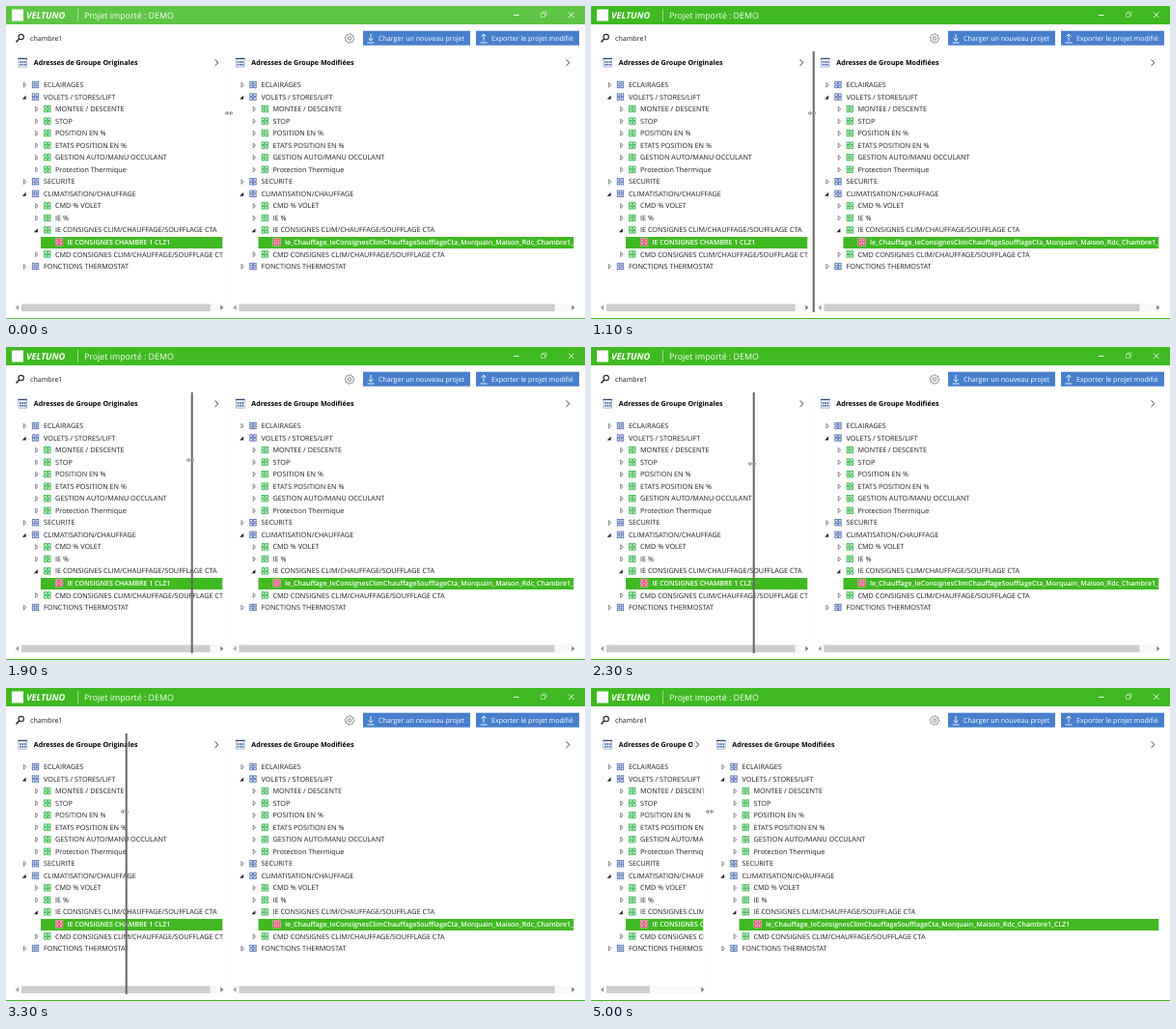
An HTML page that plays this animation: 600x324 px, repeating every 5100 ms.

```html
<!DOCTYPE html>
<html lang="fr">
<head>
<meta charset="utf-8">
<title>Projet importé</title>
<style>
  html, body { margin: 0; width: 100%; height: 100%; overflow: hidden; background: #fff; }
  svg { display: block; }
  text { font: 7.25px "Open Sans", "Noto Sans", sans-serif; fill: #1c1c1c; white-space: pre; text-rendering: geometricPrecision; }
  .line { fill: none; stroke: #333; }
</style>
</head>
<body>
<svg id="stage" width="600" height="324" viewBox="0 0 600 324"></svg>
<script>
const GREEN = '#40b922', BLUE = '#477fcc', LOOP = 5100;
const ACTIVATE = 400, PRESS = 500, DROP = 3600, SHIFT = 108;
const DRAG = [[1100, 230], [1500, 215], [2300, 168], [2800, 137], [3300, 124]];

// [level, label, state]: "+" closed, "-" open, "*" selected
const TREE = [
  [0, 'ECLAIRAGES', '+'],
  [0, 'VOLETS / STORES/LIFT', '-'],
  [1, 'MONTEE / DESCENTE', '+'],
  [1, 'STOP', '+'],
  [1, 'POSITION EN %', '+'],
  [1, 'ETATS POSITION EN %', '+'],
  [1, 'GESTION AUTO/MANU OCCULANT', '+'],
  [1, 'Protection Thermique', '+'],
  [0, 'SECURITE', '+'],
  [0, 'CLIMATISATION/CHAUFFAGE', '-'],
  [1, 'CMD % VOLET', '+'],
  [1, 'IE %', '+'],
  [1, 'IE CONSIGNES CLIM/CHAUFFAGE/SOUFFLAGE CTA', '-'],
  [2, '', '*'],
  [1, 'CMD CONSIGNES CLIM/CHAUFFAGE/SOUFFLAGE CTA', '+'],
  [0, 'FONCTIONS THERMOSTAT', '+']
];

const rect = (x, y, w, h, fill, more = '') =>
  `<rect x="${x}" y="${y}" width="${w}" height="${h}" fill="${fill}" ${more}/>`;
const path = (d, more = 'class="line"') => `<path d="${d}" ${more}/>`;
const text = (x, y, s, style = '') => `<text x="${x}" y="${y}" style="${style}">${s}</text>`;
const clip = (width, body) => `<svg width="${width}" height="324">${body}</svg>`;

function groupIcon(x, y, level) {
  const color = ['#5872b4', '#35b64d', '#d9406a'][level];
  const fill = ['#e4e9f6', '#e0f5e2', '#fbd5dc'][level];
  const cell = (dx, dy) => rect(x + dx, y + dy, 2.6, 2.6, fill, `stroke="${color}" stroke-width=".9"`);
  const back = level == 2 ? rect(x - 4, y - 4, 8, 8, '#fbe3e8') : '';
  return back + cell(-3.2, -3.2) + cell(.6, -3.2) + cell(-3.2, .6) + cell(.6, .6);
}

function treeRow([level, label, state], i, selected, barEnd) {
  const y = 81.5 + i * 12.53, x = 18.8 + level * 12.3;
  const icon = groupIcon(30.5 + level * 12.3, y, level), tx = 39 + level * 12;
  if (state == '*')
    return rect(36, 239, barEnd - 36, 12, GREEN) + icon +
      text(tx + .4, y + 2.8, selected, 'font-size:7px;font-weight:600;fill:#fff');
  const arrow = state == '-'
    ? path(`M${x + 1.8} ${y - 1.6}v4h-4z`, 'fill="#222"')
    : path(`M${x - .4} ${y - 2.2}l2.5 2.4l-2.5 2.4z`, 'fill="#fff" stroke="#555" stroke-width=".7"');
  return arrow + icon + text(tx, y + 2.6, label);
}

function headerIcon() {
  let out = rect(12.9, 54.4, 8.7, 8.7, '#fff', 'stroke="#8b9ab5" stroke-width=".7"') +
    rect(12.6, 53.8, 9.3, 1.3, '#2b4470');
  for (let i = 0; i < 6; i++)
    out += rect(14.2 + i % 3 * 2.4, 57.2 + (i / 3 | 0) * 2.7, 1.6, 1.7, '#2c559f');
  return out;
}

function scrollbar(right, thumb) {
  return rect(9, 308, right - 9, 8.5, '#f9f9f9') + rect(16, 308.5, thumb, 7.5, '#cdcdcd') +
    path('M13 309.6l-3 2.6l3 2.6z', 'fill="#999"') +
    path(`M${right - 2.2} 309.6l3 2.6l-3 2.6z`, 'fill="#777"');
}

// A panel in its own coordinates; "right" is its inner right edge
function panel(x, right, title, selected, content) {
  const view = right - 9;
  const body = TREE.map((row, i) => treeRow(row, i, selected, right)).join('');
  return `<g transform="translate(${x})">` + headerIcon() +
    clip(right - 11, text(28.8, 61.2, title, 'font-size:7.1px;font-weight:700;fill:#000')) +
    path(`M${right - 8} 55.3l3.4 3.3l-3.4 3.3`) + clip(right, body) +
    (content > view ? scrollbar(right, view / content * (view - 15)) : '') + '</g>';
}

function layout(id, dx) {
  return `<g id="${id}">` + rect(230 - dx, 47, 1, 270, '#fafafa') +
    panel(0, 224.5 - dx, 'Adresses de Groupe Originales', 'IE CONSIGNES CHAMBRE 1 CLZ1', 221) +
    panel(225.5 - dx, 363 + dx, 'Adresses de Groupe Modifiées',
      'Ie_Chauffage_IeConsignesClimChauffageSoufflageCta_Morquain_Maison_Rdc_Chambre1_CLZ1', 367) + '</g>';
}

function button(x, w, label, arrow) {
  const white = 'fill="none" stroke="#fff" stroke-width=".9"';
  return rect(x, 25.7, w, 15, BLUE) + path(`M${x + 4.5} 38h7M${x + 8} 29v7` + arrow(x + 8), white) +
    text(x + 16, 36.2, label, 'font-size:7.1px;font-weight:500;fill:#fff');
}

function gear() {
  let d = '';
  for (let i = 0; i <= 32; i++) {
    const a = i * Math.PI / 16, r = i % 4 < 2 ? 4.8 : 3.9;
    d += `${i ? 'L' : 'M'}${356 + r * Math.cos(a)} ${33.5 + r * Math.sin(a)}`;
  }
  return path(d, 'fill="none" stroke="#777" stroke-width=".9"') +
    '<circle cx="356" cy="33.5" r="1.7" fill="none" stroke="#777" stroke-width=".9"/>';
}

const windowBar = '<g id="chrome">' + rect(0, 0, 600, 19, GREEN) + rect(0, 323, 600, 1, GREEN) + '</g>' +
  rect(6, 3.5, 12, 12, '#fff') +
  text(21, 13.2, 'VELTUNO', 'font-size:9.3px;font-weight:700;font-style:italic;fill:#fff') +
  rect(74, 3, .8, 13, '#b5e3a9') +
  text(81, 12.8, 'Projet importé : DEMO', 'font-size:8.85px;fill:#fff') +
  path('M526 9.5h5.5M583 6.5l5.5 5.5M588.5 6.5l-5.5 5.5', 'stroke="#fff" stroke-width=".9"') +
  path('M554.5 7.5h4v4h-4zM556 7.5v-1.5h4v4h-1.5', 'fill="none" stroke="#fff" stroke-width=".5"');

const toolbar = '<circle cx="15.7" cy="32" r="2.7" class="line" stroke-width="1.2"/>' +
  path('M13.7 34l-3.2 3.4', 'class="line" stroke-width="1.6"') +
  text(25, 36.2, 'chambre1', 'font-size:7.1px') + gear() +
  button(370, 111, 'Charger un nouveau projet', x => `M${x - 2.5} 33.5l2.5 2.5l2.5-2.5`) +
  button(487, 107, 'Exporter le projet modifié', x => `M${x - 2.5} 31.5l2.5-2.5l2.5 2.5`);

const cursor = '<g id="cursor">' +
  path('M-1.5-1.6l-2.6 1.6l2.6 1.6zM1.5-1.6l2.6 1.6l-2.6 1.6z', 'fill="#fff" stroke="#555" stroke-width=".6"') +
  path('M-1.5 0h3', 'class="line" stroke-width=".5"') + '</g>';

const $ = id => document.getElementById(id);
$('stage').innerHTML = windowBar + toolbar + layout('wide', 0) + layout('narrow', SHIFT) +
  rect(0, 47, 2, 270, '#666', 'id="bar"') + cursor;

function splitAt(t) {
  if (t <= DRAG[0][0]) return DRAG[0][1];
  for (let i = 1; i < DRAG.length; i++) {
    const [t0, x0] = DRAG[i - 1], [t1, x1] = DRAG[i];
    if (t < t1) return x0 + (x1 - x0) * (t - t0) / (t1 - t0);
  }
  return DRAG.at(-1)[1];
}

const show = (id, on) => $(id).setAttribute('display', on ? 'inline' : 'none');

function frame() {
  const t = Math.floor(performance.now() % LOOP / 100) * 100;
  const x = Math.round(splitAt(t)), idle = t < PRESS;
  // The window frame brightens when it gains focus
  $('chrome').setAttribute('opacity', t < ACTIVATE ? .84 : idle ? .92 : 1);
  show('wide', t < DROP);
  show('narrow', t >= DROP);
  show('bar', !idle && t < DROP);
  $('bar').setAttribute('x', x - .3);
  const cx = idle ? 231 : x - 1, cy = 111 + (230 - x) * .16;
  $('cursor').setAttribute('transform', `translate(${cx} ${cy})`);
  requestAnimationFrame(frame);
}
frame();
</script>
</body>
</html>
```
